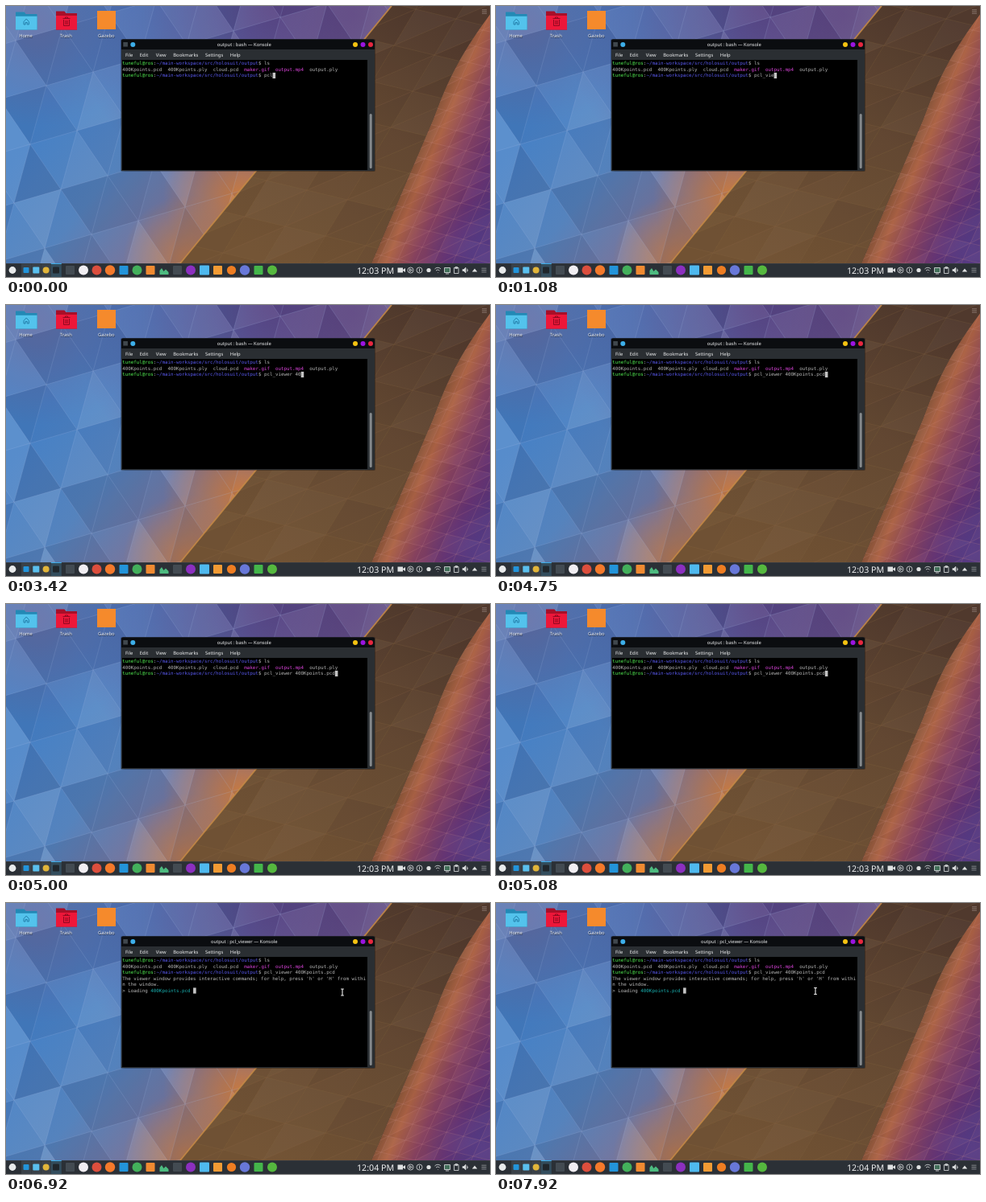
Write an HTML page that moves like this. It is 600x337 px and loops after 8 s.

```html
<!DOCTYPE html>
<html lang="en">
<head>
<meta charset="utf-8">
<title>Terminal session</title>
<style>
  html, body { margin: 0; width: 100%; height: 100%; overflow: hidden; background: #2b3036; }
  svg { display: block; width: 100vw; height: 100vh; }
  text { white-space: pre; text-rendering: geometricPrecision; }
  .ui { font-family: "Noto Sans", sans-serif; font-size: 5.85px; fill: #eff0f1; }
  .mono { font-family: "DejaVu Sans Mono", monospace; font-size: 5.84px; fill: #b8b8b8; }
  .mid { text-anchor: middle; }
</style>
</head>
<body>
<svg id="stage" viewBox="0 0 600 337" preserveAspectRatio="none">
  <defs>
    <linearGradient id="left" gradientUnits="userSpaceOnUse" x1="0" y1="190" x2="250" y2="395">
      <stop offset="0" stop-color="#4580c6"/><stop offset=".35" stop-color="#5583bd"/>
      <stop offset=".6" stop-color="#7478a2"/><stop offset="1" stop-color="#8d7380"/>
    </linearGradient>
    <linearGradient id="band" gradientUnits="userSpaceOnUse" x1="540" y1="0" x2="330" y2="320">
      <stop offset="0" stop-color="#4e372b"/><stop offset=".45" stop-color="#644932"/>
      <stop offset="1" stop-color="#725334"/>
    </linearGradient>
    <linearGradient id="right" gradientUnits="userSpaceOnUse" x1="490" y1="235" x2="590" y2="277">
      <stop offset="0" stop-color="#8a5539"/><stop offset=".14" stop-color="#ac6244"/>
      <stop offset=".42" stop-color="#87425f"/><stop offset=".75" stop-color="#67326f"/>
      <stop offset="1" stop-color="#553478"/>
    </linearGradient>
    <clipPath id="cl"><path d="M0 0H478L216 320H0z"/></clipPath>
    <clipPath id="cb"><path d="M478 0H608C560 62 545 100 530 140L453 320H216z"/></clipPath>
    <clipPath id="cr"><path d="M608 0C560 62 545 100 530 140L453 320H608z"/></clipPath>
  </defs>

  <g id="wall"></g>
  <g id="desk"></g>
  <g id="panel"></g>

  <g id="window">
    <rect x="142" y="41" width="316" height="165" rx="2" fill="#000" opacity=".3"/>
    <path d="M143 205V43.500a2 2 0 0 1 2-2H455a2 2 0 0 1 2 2V205z" fill="#2a2e32"/>
    <path d="M143 54V43.500a2 2 0 0 1 2-2H455a2 2 0 0 1 2 2V54z" fill="#0b0d10"/>
    <rect x="144" y="67" width="304" height="137" fill="#000"/>
    <rect x="450.700" y="134" width="3" height="68" rx="1.500" fill="#85898c"/>
    <rect x="145.300" y="45" width="5.600" height="5.600" fill="#40474d"/>
    <circle cx="157.300" cy="48" r="3" fill="#3daee9"/>
    <circle cx="433" cy="48" r="3" fill="#f5c211"/>
    <circle cx="442.500" cy="48" r="3" fill="#9a14e0"/>
    <circle cx="452" cy="48" r="3" fill="#e6273f"/>
    <text id="title" class="ui mid" x="295.300" y="50.200"></text>
  </g>
  <g id="term"></g>
  <rect id="block" width="3.600" height="7.200" fill="#c4c4c4"/>

  <path id="arrow" d="M0 0V9L2.200 7 3.700 10 5 9.400 3.600 6.500H6.400z" fill="#fff" stroke="#222" stroke-width=".5"/>
  <path id="beam" d="M-1.800 -4H1.800M-1.800 4H1.800M0 -4V4" fill="none" stroke="#f2f2f2" stroke-width="1.100"/>
</svg>

<script>
const $ = id => document.getElementById(id);

function add(parent, tag, attrs, text) {
  const el = document.createElementNS("http://www.w3.org/2000/svg", tag);
  for (const k in attrs) el.setAttribute(k, attrs[k]);
  if (text !== undefined) el.textContent = text;
  return parent.appendChild(el);
}

// ---- wallpaper ----
let seed = 41;
const rnd = () => (seed = (seed * 16807) % 2147483647) / 2147483647;
const wall = $("wall"), defs = document.querySelector("defs");

function glow(g, x, y, r, color, alpha) {
  const id = "g" + defs.children.length;
  const grad = add(defs, "radialGradient", { id });
  add(grad, "stop", { offset: 0, "stop-color": color, "stop-opacity": alpha });
  add(grad, "stop", { offset: 1, "stop-color": color, "stop-opacity": 0 });
  add(g, "circle", { cx: x, cy: y, r, fill: `url(#${id})` });
}

// Lattice of triangles spanned by u and v, each slightly lighter or darker
function facets(g, u, v, amp, line) {
  const n = Math.ceil(1100 / u[0]);
  for (let j = -n; j < n; j++) {
    for (let i = -n; i < n; i++) {
      const x = 300 + i * u[0] + j * v[0], y = 160 + i * u[1] + j * v[1];
      if (x < -100 || x > 700 || y < -100 || y > 400) continue;
      const p = (a, b) => `${(x + a * u[0] + b * v[0]).toFixed(1)} ${(y + a * u[1] + b * v[1]).toFixed(1)}`;
      for (const d of [`M${p(0, 0)}L${p(1, 0)} ${p(0, 1)}z`, `M${p(1, 0)}L${p(1, 1)} ${p(0, 1)}z`]) {
        const s = rnd() - .5;
        add(g, "path", { d, fill: s > 0 ? "#fff" : "#181838", "fill-opacity": (Math.abs(s) * amp).toFixed(3),
          stroke: line, "stroke-width": .5, "stroke-opacity": .2 });
      }
    }
  }
}

function region(clip, fill) {
  const g = add(wall, "g", { "clip-path": `url(#${clip})` });
  add(g, "rect", { width: 610, height: 320, fill: `url(#${fill})` });
  return g;
}

const left = region("cl", "left");
glow(left, 330, 0, 250, "#574687", 1);
glow(left, 430, 10, 150, "#593f7c", .8);
glow(left, 40, 20, 130, "#6a6698", .7);
glow(left, 290, 235, 95, "#c97b42", 1);
glow(left, 225, 315, 80, "#c07c4b", .95);
facets(left, [58, -17], [38, 56], .26, "#a9c4ea");
const band = region("cb", "band");
facets(band, [50, 12], [-27, 45], .07, "#8f6d48");
const right = region("cr", "right");
glow(right, 590, 305, 70, "#59408c", .6);
facets(right, [21, 5], [-9, 20], .08, "#c58a8c");
add(wall, "path", { d: "M478 0L216 320", stroke: "#c88b45", "stroke-width": 1.8, opacity: .85 });

// ---- desktop icons ----
const desk = $("desk");

function folder(x, y, w, h, back, front) {
  add(desk, "path", { d: `M${x} ${y}h${w * .4}l2 2.500h${w * .6 - 2}v${h - 2.5}h${-w}z`, fill: back });
  add(desk, "rect", { x, y: y + h * .24, width: w, height: h * .76, fill: front });
}
function label(x, s) {
  add(desk, "text", { class: "ui mid", x: x + .4, y: 39.6, style: "fill:#000;opacity:.6" }, s);
  add(desk, "text", { class: "ui mid", x, y: 39.2 }, s);
}
folder(12, 7.5, 26.5, 22, "#2389b5", "#53c3ec");
add(desk, "path", { d: "M22 19.500L25.200 16 28.400 19.500V23H26.300V20.500H24.100V23H22z", fill: "none", stroke: "#2079a5", "stroke-width": .9 });
folder(62, 6.5, 26, 23, "#a80f28", "#ed1739");
add(desk, "path", { d: "M70.500 15.500H79.500M73.500 15.500V14H76.500V15.500M71.500 17V24.500H78.500V17M74 18V23M76 18V23", fill: "none", stroke: "#86071f", "stroke-width": .9 });
add(desk, "rect", { x: 113, y: 6, width: 23, height: 23, fill: "#f58a2c" });
label(24.5, "Home");
label(74.3, "Trash");
label(124.3, "Gazebo");
add(desk, "path", { d: "M590 4.800H596M590 7H596M590 9.200H596", stroke: "#b9a9a4", "stroke-width": .7, opacity: .75 });

// ---- bottom panel ----
const panel = $("panel");
const dot = (x, fill, r = 5.6) => add(panel, "circle", { cx: x, cy: 328.5, r, fill });
const box = (x, fill, s = 11) => add(panel, "rect", { x: x - s / 2, y: 328.5 - s / 2, width: s, height: s, rx: 1, fill });
const glyph = (d, fill = "none") => add(panel, "path", { d, fill, stroke: "#dfe1e2", "stroke-width": .8 });

add(panel, "rect", { y: 320, width: 600, height: 17, fill: "#2b3036" });
add(panel, "rect", { y: 320, width: 600, height: .7, fill: "#3b4046" });
for (const x of [25, 37.3, 49.6]) add(panel, "rect", { x: x - 6, y: 320, width: 12, height: 17, fill: "#3a4148" });
add(panel, "rect", { x: 55.800, y: 320, width: 13, height: 17, fill: "#334d5d" });
add(panel, "rect", { x: 55.800, y: 320, width: 13, height: 1, fill: "#3daee9" });
dot(8, "#e8eaeb", 4.4);
box(25, "#2394da", 7);
box(37.3, "#5ac0ee", 8);
dot(49.6, "#e2b53a", 4);
box(62, "#20262b", 8);
box(79.5, "#434b52");
dot(96, "#f1eef2", 6);
dot(112.5, "#dc4e3d", 6);
dot(129, "#f4792b", 6.2);
box(146, "#2394da");
dot(162.5, "#43b05b", 6);
box(179, "#f08a31");
glyph("M190.500 334V329L193 326 195.500 330 198 327.500 201.500 331V334z", "#4dbb80").setAttribute("stroke", "none");
box(212.5, "#434b52");
dot(229, "#8b2fbf", 6);
box(246, "#4fb9ef", 12);
box(262.5, "#f29b34");
dot(279.5, "#ee7d22", 5.6);
dot(296, "#6878d8", 6.2);
box(313, "#44b64a");
dot(330, "#55b83e", 6);

const clock = add(panel, "text", { class: "ui", x: 435, y: 333, style: "font-size:10.700px" });

add(panel, "path", { d: "M485.500 325.500H492V331.500H485.500zM492 328L495 326V331L492 329z", fill: "#dfe1e2" });
glyph("M505 328.500a3.500 3.500 0 1 1-7 0a3.500 3.500 0 1 1 7 0M500.500 326.800L503.500 328.500 500.500 330.200z");
glyph("M516 328.500a3.500 3.500 0 1 1-7 0a3.500 3.500 0 1 1 7 0M512.500 326.500V330.500");
dot(524, "#dfe1e2", 2.6);
glyph("M531.500 327a5 5 0 0 1 7.500 0M533 329a3.200 3.200 0 0 1 4.500 0M535 331.500h.500");
glyph("M543.500 325.500H550.500V331.500H543.500zM545 333H549", "#43705a");
glyph("M555.500 325.500H561V332.500H555.500zM557 325V324.500H559.500V326.500H557z");
glyph("M566 327.500H567.500L570 325V332L567.500 329.500H566zM571.500 326.500a3 3 0 0 1 0 4", "#dfe1e2").setAttribute("stroke-width", .5);
add(panel, "path", { d: "M577.800 330.500L581 326.500 584.200 330.500z", fill: "#dfe1e2" });
glyph("M589.500 326.200H595.500M589.500 328.500H595.500M589.500 330.800H595.500").setAttribute("opacity", .65);

// ---- terminal ----
const menu = [["File", 148], ["Edit", 165.8], ["View", 185.8], ["Bookmarks", 207.3], ["Settings", 247], ["Help", 277.8]];
for (const [s, x] of menu) add($("window"), "text", { class: "ui", x, y: 63 }, s);

const term = $("term"), CW = 3.515, ROW = 7.5, X0 = 144.2, Y0 = 67.8;
const GREY = "#b8b8b8", GREEN = "#54f254", BLUE = "#5a5af0", PINK = "#dc44dc", CYAN = "#18b2b2";

function put(row, col, s, fill = GREY, parent = term) {
  return add(parent, "text", { class: "mono", x: X0 + col * CW, y: Y0 + row * ROW + 5.6, style: `fill:${fill}` }, s);
}
function prompt(row) {
  put(row, 0, "tuneful@ros", GREEN);
  put(row, 11, ":");
  put(row, 12, "~/main-workspace/src/holosuit/output", BLUE);
  put(row, 48, "$");
}
prompt(0);
put(0, 50, "ls");
put(1, 0, "400Kpoints.pcd");
put(1, 16, "400Kpoints.ply");
put(1, 32, "cloud.pcd");
put(1, 43, "maker.gif", PINK);
put(1, 54, "output.mp4", PINK);
put(1, 66, "output.ply");
prompt(2);
const typed = put(2, 50, "");
const reply = add(term, "g", {});
put(3, 0, "The viewer window provides interactive commands; for help, press 'h' or 'H' from withi", GREY, reply);
put(4, 0, "n the window.", GREY, reply);
put(5, 0, "> Loading", GREY, reply);
put(5, 10, "400Kpoints.pcd", CYAN, reply);

// ---- timeline, in ticks of 1/12 s ----
const LOOP = 8000, COMMAND = "pcl_viewer 400Kpoints.pcd";
const keys = [[0, 3], [5, 4], [8, 5], [10, 6], [13, 7], [15, 8], [17, 9], [19, 10], [22, 11],
  [38, 12], [41, 13], [46, 23], [51, 24], [57, 25]];
const ENTER = 64, REPLY = 66, TITLE = 70, MINUTE = 73;
const mouse = [[81, 566, 32], [82, 482, 80], [83, 417, 111], [84, 402, 112], [85, 396, 111],
  [86, 394, 110], [89, 393, 110], [92, 395, 109.5], [95, 396, 109.5]];

const latest = (list, tick) => list.filter(k => k[0] <= tick).pop();
const show = (el, on) => el.setAttribute("visibility", on ? "visible" : "hidden");

function draw(ms) {
  // small bias so that times rounded to 10 ms fall on their tick
  const tick = Math.floor(ms * 12 / 1000 + .06);
  const n = latest(keys, tick)[1];
  typed.textContent = COMMAND.slice(0, n);
  show(reply, tick >= REPLY);

  const [row, col] = tick >= REPLY ? [5, 25] : tick >= ENTER ? [3, 0] : [2, 50 + n];
  $("block").setAttribute("x", X0 + col * CW);
  $("block").setAttribute("y", Y0 + row * ROW + .1);

  $("title").textContent = `output : ${tick >= TITLE ? "pcl_viewer" : "bash"} — Konsole`;
  clock.textContent = tick >= MINUTE ? "12:04 PM" : "12:03 PM";

  const m = latest(mouse, tick), inside = m && m[1] < 448;
  show($("arrow"), m && !inside);
  show($("beam"), inside);
  if (m) $(inside ? "beam" : "arrow").setAttribute("transform", `translate(${m[1]} ${m[2]})`);
}

const start = performance.now();
function loop() {
  draw((performance.now() - start) % LOOP);
  requestAnimationFrame(loop);
}
draw(0);
requestAnimationFrame(loop);
</script>
</body>
</html>
```
